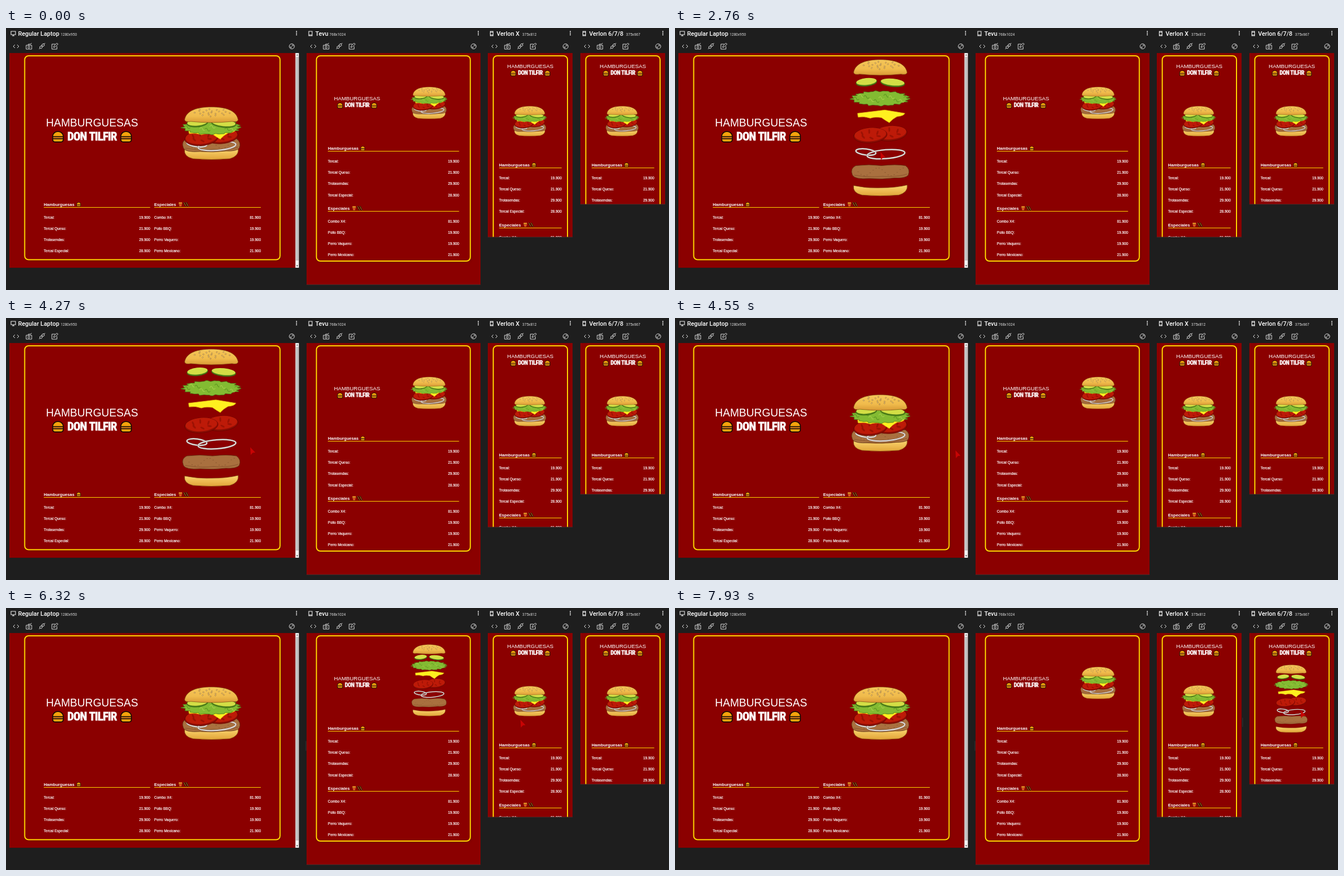
Write an HTML page with a canvas that moves like this. It is 1189 px wide and 471 px high and loops after 8000 ms.

```html
<!DOCTYPE html>
<html lang="es">
<head>
<meta charset="utf-8">
<title>Menú adaptable</title>
<style>
  html, body { margin: 0; width: 100%; height: 100%; overflow: hidden; background: #1e1e1e; }
  canvas { display: block; }
</style>
</head>
<body>
<canvas id="stage" width="1189" height="471"></canvas>
<script>
const W = 1189, H = 471, LOOP = 8000, SLIDE = 330;
const RED = '#8b0000', GOLD = '#ffd700';
const ARIAL = '"Liberation Sans", Arial, sans-serif';
const ROBOTO = 'Roboto, sans-serif';
const HEAVY = 'Impact, "Roboto Condensed", "Open Sans Condensed", Roboto, sans-serif';
const stage = document.getElementById('stage').getContext('2d');
const base = document.createElement('canvas');
base.width = W;
base.height = H;
let g = base.getContext('2d');

const BURGERS = [
  ['Tercal:', '19.900'], ['Tercal Queso:', '21.900'],
  ['Trotasendas:', '29.900'], ['Tercal Especial:', '28.900']
];
const SPECIALS = [
  ['Combo X4:', '81.900'], ['Pollo BBQ:', '19.900'],
  ['Perro Vaquero:', '19.900'], ['Perro Mexicano:', '21.900']
];

// --- drawing helpers ---
function text(str, x, y, font, { color = '#fff', align = 'left', bold = 0 } = {}) {
  g.font = font;
  g.fillStyle = g.strokeStyle = color;
  g.textAlign = align;
  g.fillText(str, x, y);
  if (bold) {
    g.lineWidth = bold;
    g.strokeText(str, x, y);
  }
}

function rect(x, y, w, h, color) {
  g.fillStyle = color;
  g.fillRect(x, y, w, h);
}

function paint(path, fill, stroke, width = 1) {
  if (fill) { g.fillStyle = fill; g.fill(path); }
  if (stroke) { g.strokeStyle = stroke; g.lineWidth = width; g.stroke(path); }
}

function oval(x, y, rx, ry, fill, stroke, width, tilt = 0) {
  const p = new Path2D();
  p.ellipse(x, y, rx, ry, tilt, 0, Math.PI * 2);
  paint(p, fill, stroke, width);
}

function at(x, y, s, draw) {
  g.save();
  g.translate(x, y);
  g.scale(s, s);
  draw();
  g.restore();
}

function line(d, color = '#ddd', width = 1) {
  paint(new Path2D(d), null, color, width);
}

// --- small pictograms ---
function burgerIcon(x, y, size) {
  at(x, y, size / 20, () => {
    paint(new Path2D('M-10 0C-10-13 10-13 10 0L10 5Q10 10 5 10H-5Q-10 10-10 5Z'), '#160c04');
    paint(new Path2D('M-8.4-0.8C-7.6-10.5 7.6-10.5 8.4-0.8Z'), '#f5a30c');
    paint(new Path2D('M-8.4 0.6H8.4V3.2H-8.4Z'), '#c9761a');
    paint(new Path2D('M-8.4 4.5H8.4Q8.4 8.4 5 8.4H-5Q-8.4 8.4-8.4 4.5Z'), '#f5a30c');
  });
}

function friesIcon(x, y) {
  at(x, y, 1, () => {
    rect(-3, -3.5, 6, 4, '#f0a028');
    paint(new Path2D('M-3.2-1H3.2L2 4H-2Z'), '#e0521e', '#4a1204', 0.5);
  });
}

function baconIcon(x, y) {
  for (const dx of [-2, 2]) {
    const d = `M${x + dx - 2} ${y - 3.5}l1.6 2.2 .8 2.2 1.8 2.6`;
    line(d, '#1a0a00', 2.6);
    line(d, '#e0a030', 0.9);
  }
}

// --- burger, one painter per layer, centred on its own middle ---
function bottomBun() {
  const fill = g.createLinearGradient(0, -9, 0, 10);
  fill.addColorStop(0, '#fbd56f');
  fill.addColorStop(1, '#e2a63a');
  paint(new Path2D('M-48-8Q-25-3 0-4Q28-4 48-9Q50 4 33 9Q0 12-33 9Q-50 5-48-8Z'), fill, '#7a4a12', 0.7);
}

function patty() {
  paint(new Path2D('M-44-11Q-20-14 2-11Q28-14 45-11Q54-5 50 6Q45 12 26 11Q4 14-20 12Q-46 14-50 6Q-55-6-44-11Z'),
    '#a9703f', '#5e3415', 0.8);
  line('M-47 6Q-20 11 4 8Q30 10 48 4', '#945d33', 1.5);
  for (let i = 0; i < 16; i++) {
    oval(-40 + i * 5.4, Math.sin(i * 7) * 7, 1.3, 0.6, '#8d5930');
  }
}

function onion() {
  for (const [x, y, rx, ry, tilt] of [[-26, -3, 18, 5.5, 0.12], [10, 1, 34, 8, -0.08]]) {
    oval(x, y, rx, ry, null, '#756a66', 3, tilt);
    oval(x, y, rx, ry, null, '#e6dedb', 2, tilt);
  }
}

function tomato() {
  for (const [x, y] of [[18, -2.5], [-18, 1]]) {
    oval(x, y + 1, 30, 13.5, '#8e0d04', '#5c0500', 0.7, -0.08);
    oval(x, y - 0.5, 28.5, 12, '#bd1a08', null, 0, -0.08);
    for (let i = 0; i < 6; i++) {
      const a = i * Math.PI / 3 + 0.4;
      oval(x + Math.cos(a) * 16, y + Math.sin(a) * 6, 4, 1.6, '#9c1204', null, 0, a / 3);
    }
  }
}

function cheese() {
  paint(new Path2D('M-41-5L8-11L44-5Q42 0 30 1Q22 5 16 12Q9 8 2 3Q-10 1-18 4Q-28 0-40 2Z'),
    '#fff01f', '#d59a10', 0.8);
}

function lettuce() {
  const p = new Path2D();
  for (let i = 0; i <= 160; i++) {
    const a = i / 160 * Math.PI * 2;
    const r = 0.92 + 0.05 * Math.sin(a * 17) + 0.03 * Math.sin(a * 29 + 1);
    p.lineTo(Math.cos(a) * 55 * r, Math.sin(a) * 14 * r);
  }
  p.closePath();
  paint(p, '#83bb32', '#47771a', 0.8);
  for (let i = 0; i < 11; i++) {
    const x = -48 + i * 9, y = Math.sin(i * 5) * 5;
    line(`M${x} ${y}q3-5 5 0t5 1`, i % 2 ? '#a6d04c' : '#5f9622', 1.2);
  }
}

function pickles() {
  for (const [x, y, rx, tilt] of [[-25, -1, 19, -0.1], [22, 0, 22, 0.1]]) {
    oval(x, y + 1, rx, 7, '#4b7d18', '#2f5510', 0.5, tilt);
    oval(x, y - 0.6, rx - 0.8, 6.1, '#d3de45', null, 0, tilt);
  }
}

function topBun() {
  const fill = g.createLinearGradient(0, -14, 0, 14);
  fill.addColorStop(0, '#f4c65a');
  fill.addColorStop(0.6, '#f0bb4c');
  fill.addColorStop(1, '#d99a35');
  paint(new Path2D('M-48 9C-45-8-25-14 0-14C25-14 45-8 48 9Q47 14 37 12Q0 16-37 12Q-47 14-48 9Z'),
    fill, '#7a4a12', 0.7);
  for (let i = 0; i < 22; i++) {
    const a = i * 2.4, r = Math.sqrt(i / 22);
    oval(Math.cos(a) * 34 * r, -4 + Math.sin(a) * 7.5 * r, 1.3, 0.9, '#fbe3a0', '#8a5a1c', 0.6, a);
  }
}

// painter, middle when stacked, middle when apart
const LAYERS = [
  [bottomBun, 37, 103], [patty, 21, 70], [onion, 22, 37], [tomato, 7, 2],
  [cheese, -1, -31], [lettuce, -11, -63], [pickles, -18, -92], [topBun, -33, -119]
];

function burger({ x, y, s }, open) {
  for (const [draw, shut, apart] of LAYERS) {
    at(x, y + s * (shut + (apart - shut) * open), s, draw);
  }
}

// --- fixed page parts ---
function title(cx, y, size) {
  text('HAMBURGUESAS', cx, y, `${size}px ${ARIAL}`, { align: 'center' });
  const name = 'DON TILFIR', room = size * 4.57, mid = y + size * 0.9;
  let px = size * 1.16;
  const font = () => `900 condensed ${px}px ${HEAVY}`;
  const fits = () => {
    g.font = font();
    g.letterSpacing = `${-px * 0.03}px`;
    return g.measureText(name).width <= room;
  };
  while (!fits() && px > 4) px -= 0.25;
  text(name, cx, mid + px * 0.36, font(), { align: 'center', bold: size * 0.04 });
  g.letterSpacing = '0px';
  burgerIcon(cx - size * 3.14, mid + 0.5, size * 1.06);
  burgerIcon(cx + size * 3.14, mid + 0.5, size * 1.06);
}

function menu(name, items, x, right, y) {
  text(name, x, y + 2.8, `bold 7.6px ${ARIAL}`);
  if (items === BURGERS) burgerIcon(x + 62.5, y, 8);
  else { friesIcon(x + 47, y); baconIcon(x + 57, y); }
  rect(x, Math.round(y + 4.9), right - x, 1, GOLD);
  items.forEach(([dish, price], i) => {
    const row = y + 25.6 + i * 20.25, font = `6.49px ${ARIAL}`;
    text(dish, x, row, font, { bold: 0.2 });
    text(price, right, row, font, { align: 'right', bold: 0.2 });
  });
}

function toolbar(x, right, name, size, sizeX, kind) {
  const screen = {
    desk: 'M-4-4H4V2H-4ZM-2 4H2M0 2V4',
    pad: 'M-3-4H3V4H-3ZM-3 2.5H3',
    phone: 'M-2.5-4H2.5V4H-2.5ZM-2.5-2.5H2.5M-2.5 2.5H2.5'
  };
  at(x + 7, 10, 1, () => line(screen[kind], '#eee', 1.1));
  text(name, x + 15.7, 14, `500 10.9px ${ROBOTO}`);
  text(size, sizeX, 14, `6.6px ${ROBOTO}`, { color: '#ddd' });
  for (const y of [6.3, 9.3, 12.3]) oval(right - 4, y, 1, 1, '#fff');
  const icons = [
    'M-2-3L-5 0L-2 3M2-3L5 0L2 3',
    'M-5-2H5V5H-5ZM-1-2V-4H3M1.8 1.5A1.8 1.8 0 1 1-1.8 1.5A1.8 1.8 0 1 1 1.8 1.5M3-4L5-6',
    'M-5 5L-3 3M-3 3L-4 1L-1-1L1 2L-1 4ZM1-1L0-3L3-5L5-2L3 0ZM4-4L6-6M-1-1L0-2M1 1L2 0',
    'M1-4H-5V5H4V0M-2 2L-1-1L4-6L6-4L1 1Z'
  ];
  icons.forEach((d, i) => at(x + 12 + i * 23.1, 33, 1, () => line(d)));
  at(right - 12.4, 33, 1, () => {
    oval(0, 0, 4.6, 4.6, null, '#ddd', 1);
    line('M0-2.5H2.5V0M0 2.5H-2.5V0M2-2L-2 2', '#ccc', 0.8);
  });
}

// page area with a gold card that casts a soft shadow
function screen(x, w, h, frame, draw) {
  const card = new Path2D();
  card.roundRect(...frame, 7);
  g.save();
  g.beginPath();
  g.rect(x, 45, w, h);
  g.clip();
  rect(x, 45, w, h, RED);
  g.shadowColor = 'rgba(0, 0, 0, 0.3)';
  g.shadowBlur = 5;
  g.shadowOffsetX = g.shadowOffsetY = 1;
  paint(card, RED, null);
  g.shadowColor = 'transparent';
  paint(card, null, GOLD, 2);
  draw();
  g.restore();
}

function scrollbar() {
  rect(519, 45, 6.5, 386, '#f1f1f1');
  rect(519.6, 52, 5.3, 366, '#c1c1c1');
  paint(new Path2D('M520.5 49.5H524L522.2 47Z'), '#777');
  paint(new Path2D('M520.5 426.5H524L522.2 429Z'), '#555');
}

function buildBase() {
  rect(0, 0, W, H, '#1e1e1e');
  toolbar(6, 525, 'Regular Laptop', '1280x950', 98, 'desk');
  toolbar(539, 851, 'Tevu', '768x1024', 580, 'pad');
  toolbar(864, 1016, 'Verlon X', '375x812', 926, 'phone');
  toolbar(1030, 1182, 'Verlon 6/7/8', '375x667', 1112, 'phone');

  screen(6, 519.5, 386, [33.5, 50, 458, 366.5], () => {
    title(154.3, 177.3, 19.46);
    menu('Hamburguesas', BURGERS, 67.8, 258.5, 317);
    menu('Especiales', SPECIALS, 265.8, 457, 317);
    scrollbar();
  });
  screen(539, 312, 416.5, [556.7, 50, 276, 369], () => {
    title(629.6, 130, 9.75);
    menu('Hamburguesas', BURGERS, 577.3, 812.5, 216.3);
    menu('Especiales', SPECIALS, 577.3, 812.5, 324);
  });
  for (const [x, h] of [[864, 331], [1030, 272]]) {
    screen(x, 152.3, h, [x + 9.8, 50, 133.2, 420], () => {
      title(x + 76.3, 72, 9.75);
      menu('Hamburguesas', BURGERS, x + 20.3, x + 132.5, 246);
      menu('Especiales', SPECIALS, x + 20.3, x + 132.5, 353.7);
    });
  }
  for (const [x, y, w] of [[539, 461, 312], [864, 375.5, 152], [1030, 316.5, 152]]) {
    rect(x, y, w, 0.8, '#4a3030');
  }
}

// --- motion ---
const mix = (a, b, k) => a + (b - a) * k;
const clamp = v => Math.min(1, Math.max(0, v));

// cubic-bezier(.25, .1, .25, 1)
function ease(x) {
  x = clamp(x);
  let lo = 0, hi = 1;
  for (let i = 0; i < 20; i++) {
    const m = (lo + hi) / 2, n = 1 - m;
    if (0.75 * n * n * m + 0.75 * n * m * m + m ** 3 < x) lo = m;
    else hi = m;
  }
  return 0.3 * (1 - lo) ** 2 * lo + 3 * (1 - lo) * lo * lo + lo ** 3;
}

const STACKS = [
  { x: 368.3, y: 189, s: 1, open: 2475, shut: 4309 },
  { x: 758.8, y: 134.5, s: 0.606, open: 5230, shut: 6265 },
  { x: 939.2, y: 167.3, s: 0.569, open: 6600, shut: 7670 },
  { x: 1105, y: 167.3, s: 0.569, open: 7772, shut: LOOP + 1 }
];

// time, x, y of the pointer tip
const TRACK = [
  [1720, 0, 295], [1930, 87.5, 211], [2250, 180, 215], [2480, 258, 230], [2620, 335, 227],
  [2760, 368.5, 223], [3650, 368.5, 223], [4170, 385, 228], [4309, 458, 234], [4410, 503, 238],
  [4560, 503, 238], [4900, 600, 240], [5220, 728, 165], [5380, 742, 150], [6120, 742, 150],
  [6265, 834, 180], [6320, 922.5, 201], [6480, 930, 201], [6620, 968, 184],
  [7420, 968, 184], [7670, 1010, 190], [7772, 1050, 189], [7930, 1122, 184], [8000, 1124, 184]
];
const TIPS = [[3170, 3720], [5850, 6120], [6940, 7450]];

function pointerAt(t) {
  const i = TRACK.findIndex(k => k[0] > t);
  const [t0, x0, y0] = TRACK[i - 1], [t1, x1, y1] = TRACK[i];
  const k = (t - t0) / (t1 - t0);
  return [mix(x0, x1, k), mix(y0, y1, k)];
}

function tooltip(x, y) {
  rect(x, y, 44, 17, '#c4c4c4');
  rect(x + 1, y + 1, 42, 15, '#2b2b2b');
  text('Separada', x + 4.5, y + 11.4, '8px "Open Sans", sans-serif');
}

function handle(x, y, w, h) {
  const p = new Path2D();
  p.roundRect(x, y, w, h, 2);
  paint(p, '#2a2a2a');
}

function draw(t) {
  g = stage;
  g.drawImage(base, 0, 0);
  if (t >= 860 && t < 1460) {
    g.globalAlpha = t < 930 ? 0.5 : 1;
    handle(-3, 280, 16, 55);
    g.globalAlpha = 1;
  }
  if (t >= 4900) handle(537, 239, 2, 18);
  if (t >= 7670) handle(1017, 197, 2, 17);
  for (const b of STACKS) {
    burger(b, ease((t - b.open) / SLIDE) - ease((t - b.shut) / SLIDE));
  }
  if (t < TRACK[0][0]) return;
  const [x, y] = pointerAt(t);
  at(x, y, 1, () => paint(new Path2D('M0 0L9 9.5L4.5 10L0.8 14Z'), '#c80404'));
  if (TIPS.some(([from, to]) => t >= from && t < to)) tooltip(Math.round(x + 7), Math.round(y + 13));
}

buildBase();
const start = performance.now();
function tick() {
  draw((performance.now() - start) % LOOP);
  requestAnimationFrame(tick);
}
tick();
</script>
</body>
</html>
```
